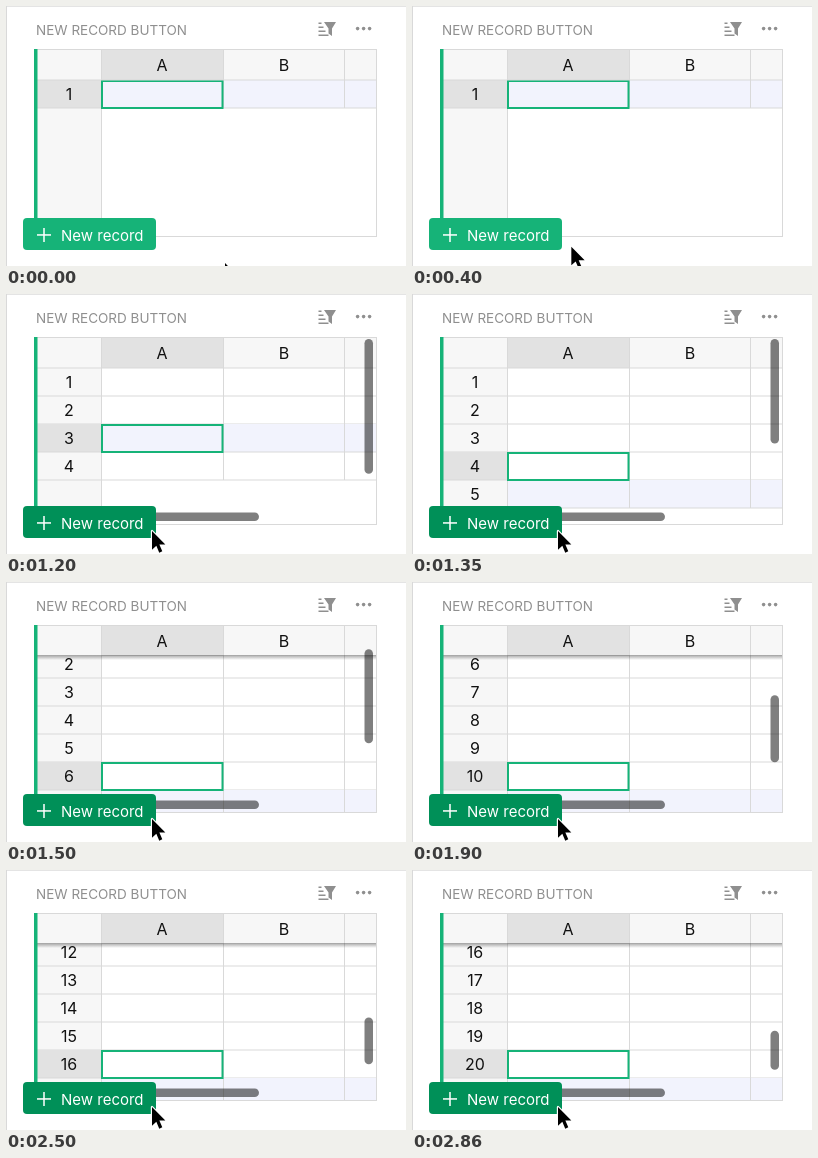
An HTML page with a canvas for the animation above (2.93 s loop, 400x260 px).

```html
<!DOCTYPE html>
<html lang="en">
<head>
<meta charset="utf-8">
<title>New record button</title>
<style>
  html, body { margin: 0; width: 100%; height: 100%; overflow: hidden; background: #fff; }
  canvas { display: block; width: 400px; height: 260px; }
</style>
</head>
<body>
<canvas id="stage" width="400" height="260"></canvas>
<script>
const ctx = document.getElementById('stage').getContext('2d');
const LOOP = 2930, STEP = 50, CLICK = 1000;
const TOP = 74, BOTTOM = 230, LEFT = 95, RIGHT = 370, ROW = 28;
const GREEN = '#16b378', LINE = '#d9d9d9', HEAD = '#f7f7f7', ACTIVE = '#e2e2e2',
      LAVENDER = '#f2f3fd', ICON = '#8f8f8f', THUMB = 'rgba(0,0,0,.5)';

function rect(x, y, w, h, color) {
  ctx.fillStyle = color;
  ctx.fillRect(x, y, w, h);
}

function pill(x, y, w, h, r, color) {
  ctx.fillStyle = color;
  ctx.beginPath();
  ctx.roundRect(x, y, w, h, r);
  ctx.fill();
}

function text(str, x, y, size, color, align = 'center') {
  ctx.font = `${size}px Inter, sans-serif`;
  ctx.textAlign = align;
  ctx.fillStyle = color;
  ctx.fillText(str, x, y);
}

function shape(points) {
  ctx.beginPath();
  points.forEach(([x, y]) => ctx.lineTo(x, y));
  ctx.closePath();
}

function toolbar() {
  text('NEW RECORD BUTTON', 30, 29, 13.5, ICON, 'left');
  [3, 5, 7, 10].forEach((w, i) => rect(312.5, 16.5 + i * 4, w, 1.5, ICON));
  ctx.fillStyle = ICON;
  shape([[318, 16], [330, 16], [326, 22.5], [326, 30], [322.5, 27.5], [322.5, 22.5]]);
  ctx.fill();
  for (let i = 0; i < 3; i++) pill(349.8 + i * 6, 20.8, 3.6, 3.6, 1.8, ICON);
}

function rows(count, selected, tinted, scroll) {
  ctx.save();
  ctx.beginPath();
  ctx.rect(31, TOP, RIGHT - 31, BOTTOM - TOP);
  ctx.clip();
  rect(31, TOP, LEFT - 31, BOTTOM - TOP, HEAD);
  for (let i = 1; i <= count; i++) {
    const y = TOP + (i - 1) * ROW - scroll;
    if (y + ROW < TOP || y > BOTTOM) continue;
    if (i === selected) rect(31, y, LEFT - 31, ROW, ACTIVE);
    if (i === tinted) rect(LEFT, y, RIGHT - LEFT, ROW, LAVENDER);
    rect(31, y + ROW - .5, RIGHT - 31, 1, LINE);
    for (const x of [217, 338]) rect(x, y, 1, ROW, LINE);
    text(i, 63, y + 19.5, 16, '#111');
  }
  rect(LEFT, TOP, 1, BOTTOM - TOP, LINE);
  ctx.restore();
  ctx.strokeStyle = GREEN;
  ctx.lineWidth = 2;
  ctx.strokeRect(96, TOP + (selected - 1) * ROW - scroll + 1, 120.5, ROW - 1);
}

function header(scrolled) {
  rect(31, 43, RIGHT - 31, TOP - 43, HEAD);
  rect(LEFT, 43, 122, TOP - 43, ACTIVE);
  for (const x of [LEFT, 217, 338]) rect(x, 43, 1, TOP - 43, LINE);
  text('A', 156, 65, 16, '#111');
  text('B', 278, 65, 16, '#111');
  if (scrolled) {
    const shade = ctx.createLinearGradient(0, 73, 0, 78);
    shade.addColorStop(0, 'rgba(0,0,0,.35)');
    shade.addColorStop(1, 'rgba(0,0,0,0)');
    rect(31, 73, RIGHT - 31, 5, shade);
  } else {
    rect(31, 73.5, RIGHT - 31, 1, LINE);
  }
}

function scrollbars(content, scroll) {
  pill(358.5, 45 + scroll * 182 / content, 8.5, 26130 / content, 4.25, THUMB);
  pill(33, 218.5, 220, 8.5, 4.25, THUMB);
}

function button(hover) {
  pill(17, 212, 133, 32, 4, hover ? '#009058' : GREEN);
  rect(31, 228.2, 14, 1.5, '#fff');
  rect(37.25, 222, 1.5, 14, '#fff');
  text('New record', 55, 234.5, 15, '#fff', 'left');
}

function pointer(x, y) {
  ctx.save();
  ctx.translate(x, y);
  ctx.scale(1.17, 1.17);
  shape([[0, 0], [0, 16], [3.7, 12.6], [6.2, 18.5], [8.8, 17.4], [6.3, 11.6], [11.4, 11.6]]);
  ctx.lineWidth = 2;
  ctx.lineJoin = 'round';
  ctx.strokeStyle = '#fff';
  ctx.stroke();
  ctx.fillStyle = '#000';
  ctx.fill();
  ctx.restore();
}

function draw(time) {
  const clicked = time >= CLICK;
  const beat = Math.floor((time - CLICK) / STEP);
  const late = beat % 2;
  // One record per two beats; the last arrives a little early.
  const n = !clicked ? 1 : time >= 2860 ? 20 : 1 + Math.floor(beat / 2);
  const settling = clicked && late && time < 2860;
  const scroll = Math.max(0, n * ROW - 134);
  const tinted = clicked && (settling || scroll) ? n + 1 : n;

  rect(0, 0, 400, 260, '#fff');
  rect(0, 0, 400, 1, '#e4e4e4');
  rect(0, 0, 1, 260, '#d9d9d9');
  toolbar();
  rows(clicked ? n + 1 : 1, n, tinted, scroll);
  header(scroll > 0);
  ctx.strokeStyle = LINE;
  ctx.lineWidth = 1;
  ctx.strokeRect(30.5, 43.5, 340, 187);
  rect(28, 43, 3.5, 188, GREEN);
  if (n > 1) scrollbars((n + 1 + (settling ? 1 : 0)) * ROW + 82, scroll);

  const p = Math.min(1, Math.floor(time / STEP) * STEP / 550);
  const ease = p * p * (3 - 2 * p);
  const x = 219 - 73 * ease, y = 257 - 20 * ease;
  button(x < 150 && y < 244);
  pointer(x, y);
}

const start = performance.now();
function tick() {
  draw((performance.now() - start) % LOOP);
  requestAnimationFrame(tick);
}
tick();
</script>
</body>
</html>
```
